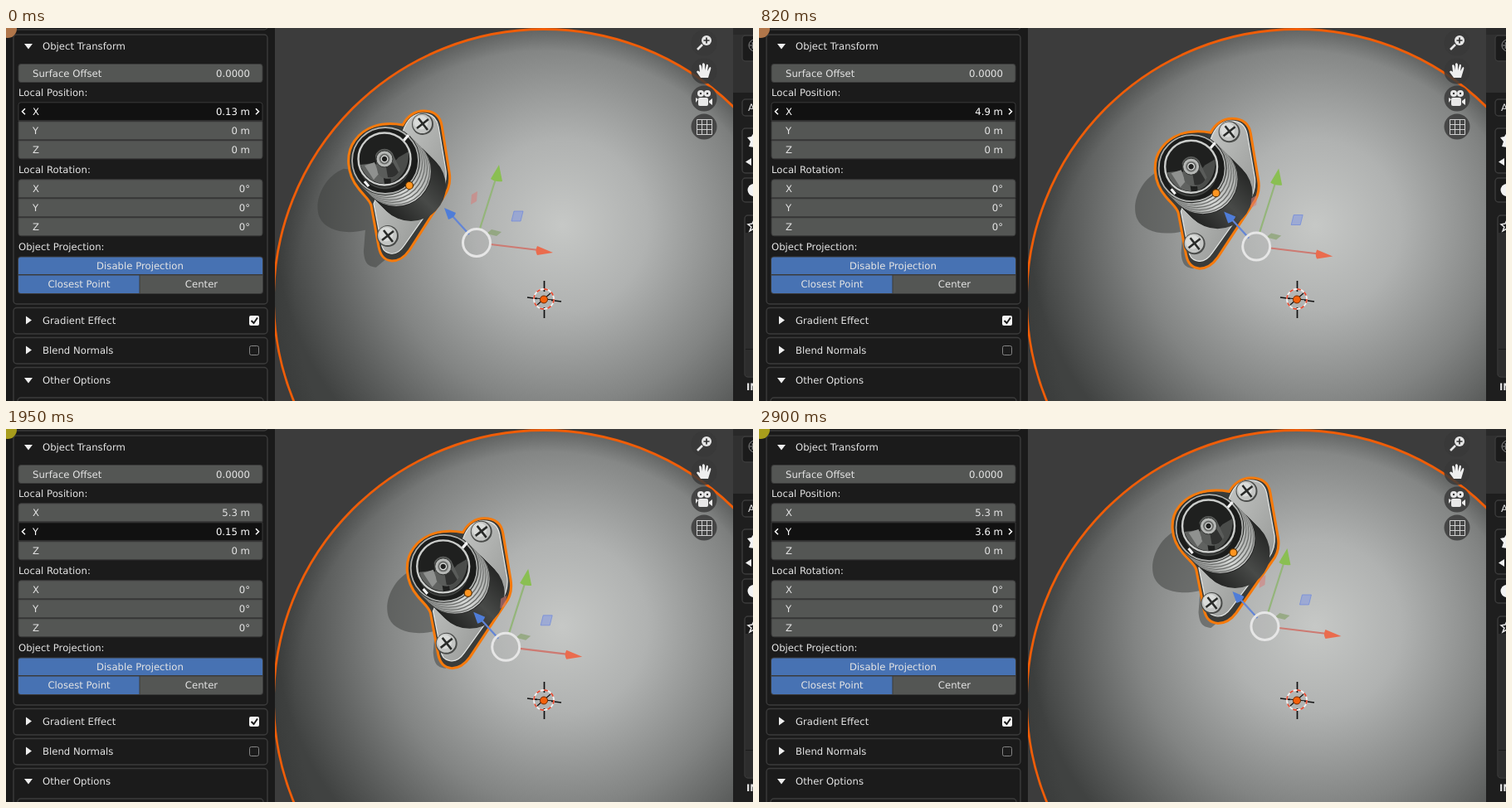
Write an HTML page that moves like this. It is 900 px wide and 450 px high and loops after 2950 ms.

```html
<!DOCTYPE html>
<html lang="en">
<head>
<meta charset="utf-8">
<title>Object Transform</title>
<style>
  html, body { margin: 0; width: 100%; height: 100%; overflow: hidden; background: #1a1a1a; }
  svg { display: block; width: 100vw; height: 100vh; }
  text { font: 11.7px "DejaVu Sans", sans-serif; fill: #e4e4e4; text-rendering: geometricPrecision; }
  .end { text-anchor: end; }
  .mid { text-anchor: middle; }
  .box { fill: #1b1b1b; stroke: #3b3b3b; stroke-width: 1.4; }
  .field { fill: #545654; }
  .blue { fill: #4772b3; }
  .chevrons { fill: none; stroke: #fff; stroke-width: 1.5; visibility: hidden; }
  .row.active .field { fill: #111; }
  .row.hover .field { fill: #7c7c7c; }
  .row.active .chevrons, .row.hover .chevrons { visibility: visible; }
  .row.active text { fill: #fff; }
  .icon { fill: none; stroke: #e6e6e6; stroke-width: 1.5; }
</style>
</head>
<body>
<svg viewBox="0 0 900 450">
  <defs>
    <radialGradient id="ball" gradientUnits="userSpaceOnUse" cx="670" cy="238" r="345">
      <stop offset="0" stop-color="#c6c8c6"/>
      <stop offset=".3" stop-color="#b0b2b1"/>
      <stop offset=".63" stop-color="#828483"/>
      <stop offset=".84" stop-color="#5c5e5d"/>
      <stop offset="1" stop-color="#404241"/>
    </radialGradient>
    <radialGradient id="limb">
      <stop offset=".92" stop-color="#2c2e2d" stop-opacity="0"/>
      <stop offset="1" stop-color="#2c2e2d" stop-opacity=".28"/>
    </radialGradient>
    <linearGradient id="plate" x1="0" y1="0" x2="1" y2="1">
      <stop offset="0" stop-color="#d0d2d0"/>
      <stop offset=".7" stop-color="#9fa19f"/>
      <stop offset="1" stop-color="#6b6d6b"/>
    </linearGradient>
    <linearGradient id="metal" x1="0" y1="1" x2="1" y2="0">
      <stop offset="0" stop-color="#666866"/>
      <stop offset=".4" stop-color="#d6d8d6"/>
      <stop offset="1" stop-color="#8a8c8a"/>
    </linearGradient>
    <linearGradient id="collar" x1="0" y1="1" x2="1" y2="0">
      <stop offset=".1" stop-color="#1e1f1e"/>
      <stop offset=".5" stop-color="#484a48"/>
      <stop offset=".9" stop-color="#222322"/>
    </linearGradient>
    <g id="screw">
      <circle r="13" fill="#494b49"/>
      <circle cx="-.5" cy="-.5" r="11.5" fill="#c3c5c3"/>
      <circle cx="-2" cy="-2" r="8.5" fill="#dadcda"/>
      <path d="M-7 5L7-6M-5-7L6 7" stroke="#292b29" stroke-width="2.6"/>
    </g>
    <clipPath id="view"><path d="M324 0H876V450H324z"/></clipPath>
  </defs>

  <g clip-path="url(#view)">
    <path d="M324 0H876V450H324z" fill="#3c3c3c"/>
    <circle cx="648" cy="327" r="325.5" fill="url(#ball)"/>
    <circle cx="648" cy="327" r="325.5" fill="url(#limb)" stroke="#ef5d08" stroke-width="2.8"/>

    <g id="shadow" fill="#3c3e3c" fill-opacity=".5">
      <path d="M-66-28C-91-18-103 13-95 31C-88 46-66 52-40 46L-42 72C-41 83-39 90-27 91L10 60L0-20z"/>
    </g>

    <g id="part">
      <g id="flange">
        <path d="M17-90C30-90 37-84 39-72L48-16C50-4 47 6 41 14L0 78C-7 88-14 91-21 91C-31 90-35 84-37 74L-46 24C-48 17-54 13-61 4C-76-14-77-39-66-54C-55-70-34-78-8-73C-3-83 6-90 17-90Z"
          fill="#3a3c3a" stroke="#f67a0c" stroke-width="3" stroke-linejoin="round"/>
        <path d="M16-87C27-87 33-81 35-71L44-18C45-7 43 1 37 10L-6 72C-12 81-18 83-23 82C-31 80-33 76-34 69L-43 22L-8-65C-3-80 5-87 16-87Z"
          fill="url(#plate)" stroke="#e3e5e3" stroke-width="1.2"/>
      </g>
      <use href="#screw" x="16" y="-74"/>
      <use href="#screw" x="-26" y="61"/>
      <g id="barrel"></g>

      <g transform="translate(-29 -30)">
        <circle r="42" fill="#2a2c2a"/>
        <circle r="40" fill="#1b1c1b" stroke="#aeb0ae" stroke-width="1.8"/>
        <path d="M22-24L28-31M-25 25L-20 31" stroke="#f2f2f2" stroke-width="3.2"/>
        <g transform="translate(-1 -2)">
          <path d="M-32 2A32 32 0 0 0 32 2L30 14A31 31 0 0 1 -28 18z" fill="#3f413f"/>
          <circle r="31.5" fill="#1f201f" stroke="#cbcdcb" stroke-width="2.4"/>
          <path d="M-29 7C-24 23-12 29 0 30L-3 10L-13 5z" fill="#606260"/>
          <path d="M-24 8L-12 4L-7 18L-13 25z" fill="#8f918f"/>
          <path d="M29-9C30 8 22 23 8 29L6 10L17-2z" fill="#4a4c4a"/>
          <path d="M-11-4A11.500 11.500 0 0 1 11-4L19 13C14 25-1 28-8 17z" fill="#5a5c5a"/>
          <path d="M2 10L10 4L17 16C13 22 8 23 4 22z" fill="#303130"/>
          <circle r="10" fill="#b6b8b6" stroke="#333533"/>
          <circle r="6.5" fill="#6c6e6c"/>
          <circle r="3.8" fill="#202120" stroke="#e0e2e0" stroke-width="1.2"/>
        </g>
      </g>
      <circle r="4.5" fill="#ff9520" stroke="#5a3000" stroke-width="1.2"/>
    </g>

    <g stroke="#111" stroke-width="1.7">
      <path d="M628 325L640 326.5M657 328.5L669 330M648.5 305V318M648.5 337V350"/>
      <circle cx="648" cy="327" r="12" fill="none" stroke="#f2f2f2" stroke-width="1.8"/>
      <circle cx="648" cy="327" r="12" fill="none" stroke="#e34b32" stroke-width="1.8" stroke-dasharray="4.7"/>
      <path d="M638 326L659 328M640 334L656 320" stroke-width="1.2"/>
      <circle cx="648" cy="327.5" r="4.5" fill="#f4600a" stroke="#6d2800" stroke-width="1"/>
    </g>

    <g id="gizmo">
      <path d="M-6-58L1-62L0-50L-7-46z" fill="#d97c78" fill-opacity=".55"/>
      <path d="M12-11L18-16L30-13L24-8z" fill="#7f9d61" fill-opacity=".6"/>
      <path d="M45-38L56-38L53-26L42-26z" fill="#7f96e4" fill-opacity=".55" stroke="#6d88dd" stroke-opacity=".7"/>
      <g stroke-width="2.2">
        <path d="M4-17L23-77" stroke="#94b57a"/>
        <path d="M17 2L75 9" stroke="#cd7a72"/>
        <path d="M-9-10L-29-32" stroke="#6385d6"/>
      </g>
      <path d="M27-94L17-77Q23-73 31-74z" fill="#8abf52"/>
      <path d="M92 12L73 4Q70 10 73 15z" fill="#ea6c4e"/>
      <path d="M-39-42L-25-36Q-27-30-34-28z" fill="#4f7dd8"/>
      <circle r="16.5" fill="#aaa" fill-opacity=".12" stroke="#e6e6e6" stroke-width="3"/>
    </g>

    <g fill="#383838" fill-opacity=".82">
      <circle cx="841" cy="18" r="15.5"/><circle cx="841" cy="52" r="15.5"/>
      <circle cx="841" cy="85" r="15.5"/><circle cx="841" cy="119" r="15.5"/>
    </g>
    <circle cx="844" cy="15" r="6" fill="#e6e6e6"/>
    <path d="M839 20L833 26" stroke="#e6e6e6" stroke-width="2.6"/>
    <path d="M844 11.500V18.500M840.500 15H847.500" stroke="#333" stroke-width="1.7"/>
    <path d="M837 60L832 53Q833 50 836 53L835 45Q837 43 838 46L839 51V43Q841 41 842 44V51L844 44Q846 43 846 46L845 52L848 47Q850 47 849 50L846 60z" fill="#eee"/>
    <g fill="#e8e8e8">
      <circle cx="837" cy="79" r="4"/><circle cx="845" cy="79" r="4"/>
      <rect x="834" y="84" width="12" height="10" rx="2"/><path d="M847 88L851 85V93L847 90zM834 86L831 84V90z"/>
    </g>
    <g fill="#333"><circle cx="837" cy="79" r="1.2"/><circle cx="845" cy="79" r="1.2"/></g>
    <path d="M832.5 110.500H850.500V128.500H832.500zM838.500 110.500V128.500M844.500 110.500V128.500M832.500 116.500H850.500M832.500 122.500H850.500"
      fill="none" stroke="#d0d0d0"/>
  </g>

  <path d="M876 0H900V450H876z" fill="#1e1e1e"/>
  <path d="M876 0H900V78H876z" fill="#303030"/>
  <path d="M876 0H900V8H876z" fill="#292929"/>
  <g class="box">
    <rect x="887" y="9" width="30" height="31" rx="4"/>
    <rect x="887" y="86" width="30" height="20" rx="4"/>
    <rect x="887" y="121" width="30" height="54" rx="4"/>
    <rect x="887" y="181" width="30" height="29" rx="4"/>
    <rect x="890" y="226" width="30" height="195" rx="4"/>
  </g>
  <path d="M891 247H900V387H891zM891 388H900V420H891z" fill="#2d2d2d"/>
  <g fill="none" stroke="#8a8a8a">
    <circle cx="902" cy="21" r="7"/>
    <path d="M896 21H900M899 17Q901 20 899 25"/>
  </g>
  <text x="894" y="100">A</text>
  <path d="M893 132L898 131L901 126V144L895 143L897 137z" fill="#f2f2f2"/>
  <path d="M898 157V166L891 161.500z" fill="#eee"/>
  <circle cx="901" cy="195.500" r="7.500" fill="#f2f2f2"/>
  <path class="icon" d="M901 232L899 236L894 237L898 240L896 245L901 242"/>
  <text x="892" y="437" style="font-weight:bold">IN</text>

  <path d="M0 0H324V450H0z" fill="#1a1a1a"/>
  <g class="box">
    <rect x="9" y="-20" width="306" height="22" rx="4"/>
    <rect x="9" y="8" width="306" height="325" rx="4"/>
    <rect x="9" y="337.500" width="306" height="31.500" rx="4"/>
    <rect x="9" y="373.500" width="306" height="31.500" rx="4"/>
    <rect x="9" y="409.500" width="306" height="60" rx="4"/>
    <rect x="14" y="446" width="296" height="30" rx="4"/>
  </g>
  <path d="M22 19H32L27 25.500zM22 422H32L27 428.500zM24 347.500L31 352.500L24 357.500zM24 383.500L31 388.500L24 393.500z" fill="#eee"/>
  <text x="44" y="26">Object Transform</text>
  <text x="15" y="81.500">Local Position:</text>
  <text x="15" y="174.500">Local Rotation:</text>
  <text x="15" y="267.500">Object Projection:</text>
  <text x="44" y="356.500">Gradient Effect</text>
  <text x="44" y="392.500">Blend Normals</text>
  <text x="44" y="428.500">Other Options</text>
  <g id="rows"></g>

  <rect x="14" y="275.500" width="296" height="45.500" rx="4" fill="#3a3a3a"/>
  <path class="blue" d="M18 276.500H306Q309 276.500 309 279.500V297H15V279.500Q15 276.500 18 276.500zM15 298.500H160.500V320H18Q15 320 15 317z"/>
  <path class="field" d="M161.500 298.500H309V317Q309 320 306 320H161.500z"/>
  <text class="mid" x="161.500" y="290.500">Disable Projection</text>
  <text class="mid" x="88" y="313">Closest Point</text>
  <text class="mid" x="235.500" y="313">Center</text>

  <rect x="293" y="347" width="12" height="12" rx="2" fill="#f5f5f5"/>
  <path d="M295.500 353L298.500 356L303 349.500" fill="none" stroke="#181818" stroke-width="1.900"/>
  <rect x="293.500" y="383.500" width="11" height="11" rx="2" fill="none" stroke="#858585"/>

  <rect id="scroll" x="313.500" y="-8" width="7" height="367" rx="3.500" fill="#505050"/>
  <circle id="corner" cx="2" cy="1" r="11"/>
  <path id="pointer" d="M-13 0L-6-6V-2H6V-6L13 0L6 6V2H-6V6z" fill="#fff" stroke="#222"/>
</svg>
<script>
const $ = id => document.getElementById(id);
const LOOP = 2950;

// [start ms, local X, local Y]
const values = [
  [0, .13, 0], [90, .7, 0], [170, 1.3, 0], [350, 2.3, 0], [450, 3, 0], [550, 3.8, 0],
  [640, 4.5, 0], [820, 4.9, 0], [920, 5.1, 0], [1010, 5.3, 0], [1950, 5.3, .15],
  [2050, 5.3, .8], [2140, 5.3, 1.4], [2320, 5.3, 2.2], [2420, 5.3, 2.6],
  [2520, 5.3, 2.9], [2620, 5.3, 3.2], [2720, 5.3, 3.5], [2900, 5.3, 3.6]
];
// [start ms, pointer height]; 0 while a field is being dragged
const pointerPath = [
  [0, 0], [1110, 100], [1210, 103], [1300, 107], [1390, 112], [1490, 118], [1580, 122], [1670, 0]
];

const at = (list, t) => list.findLast(step => step[0] <= t);
const move = (id, x, y) => $(id).setAttribute('transform', `translate(${x.toFixed(2)} ${y.toFixed(2)})`);

function row(id, y, label, value, first, last) {
  const a = first ? 3 : 0, b = last ? 3 : 0, h = 22;
  return `<g class="row" id="${id}" transform="translate(0 ${y})">
    <path class="field" stroke="#3a3a3a" d="M${15 + a} 0H${309 - a}Q309 0 309 ${a}V${h - b}Q309 ${h} ${309 - b} ${h}H${15 + b}Q15 ${h} 15 ${h - b}V${a}Q15 0 ${15 + a} 0z"/>
    <path class="chevrons" d="M23 7.500L19.500 11L23 14.500M301 7.500L304.500 11L301 14.500"/>
    <text x="32" y="15">${label}</text><text class="end" x="294" y="15">${value}</text></g>`;
}

const group = (name, top, value) => ['X', 'Y', 'Z']
  .map((axis, i) => row(name + axis, top + i * 23, axis, value, i === 0, i === 2)).join('');

$('rows').innerHTML = row('offset', 43.5, 'Surface Offset', '0.0000', true, true) +
  group('pos', 89.8, '0 m') + group('rot', 182.8, '0°');

// Barrel: discs stacked along the connector's axis, from the base to the rim.
const disc = (d, r, fill) => `<circle cx="${d - 29}" cy="${d - 30}" r="${r}" fill="${fill}"/>`;
let discs = '';
for (let d = 31; d >= 15; d--) discs += disc(d, 42, 'url(#collar)');
discs += disc(14, 41.5, '#222');
for (let d = 13; d > 0; d--) discs += disc(d, 42, d % 3 < 1 ? '#6a6c6a' : 'url(#metal)');
$('barrel').innerHTML = discs;

const format = v => `${+v.toFixed(v < 1 ? 2 : 1)} m`;

function setRow(id, value, state) {
  const el = $(id);
  el.setAttribute('class', `row ${state}`);
  el.querySelector('.end').textContent = format(value);
}

function draw(t) {
  const [, x, y] = at(values, t);
  const pointerY = at(pointerPath, t)[1];
  const dx = x - .13;
  const px = 486 + 13.55 * dx + 4.3 * y, py = 190 + 1.93 * dx - 14.15 * y;
  const lean = .49 * (5.3 - x) ** 2;

  move('part', px, py);
  move('shadow', px - lean, py + lean * .6);
  move('gizmo', 567 + 6.75 * dx + 2.1 * y, 259 + .95 * dx - 7.2 * y);

  // The flange turns with the surface: wider to the right, shorter towards the bottom.
  const widen = .005 * x + .006 * y, shorten = .0085 * y;
  $('flange').setAttribute('transform',
    `matrix(${1 + widen} 0 0 ${1 - shorten} ${72 * widen} ${-90 * shorten})`);

  const onY = pointerY ? pointerY >= 112 : t >= 1670;
  const state = pointerY ? 'hover' : 'active';
  setRow('posX', x, onY ? '' : state);
  setRow('posY', y, onY ? state : '');

  $('pointer').style.display = pointerY ? '' : 'none';
  move('pointer', 158.5, pointerY);
  $('corner').setAttribute('fill', t < 1670 ? '#b0764a' : '#a89d1c');
  $('scroll').style.display = (t >= 550 && t < 640) || (t >= 2320 && t < 2420) ? '' : 'none';
}

const start = performance.now();
function tick() {
  draw((performance.now() - start) % LOOP);
  requestAnimationFrame(tick);
}
tick();
</script>
</body>
</html>
```
